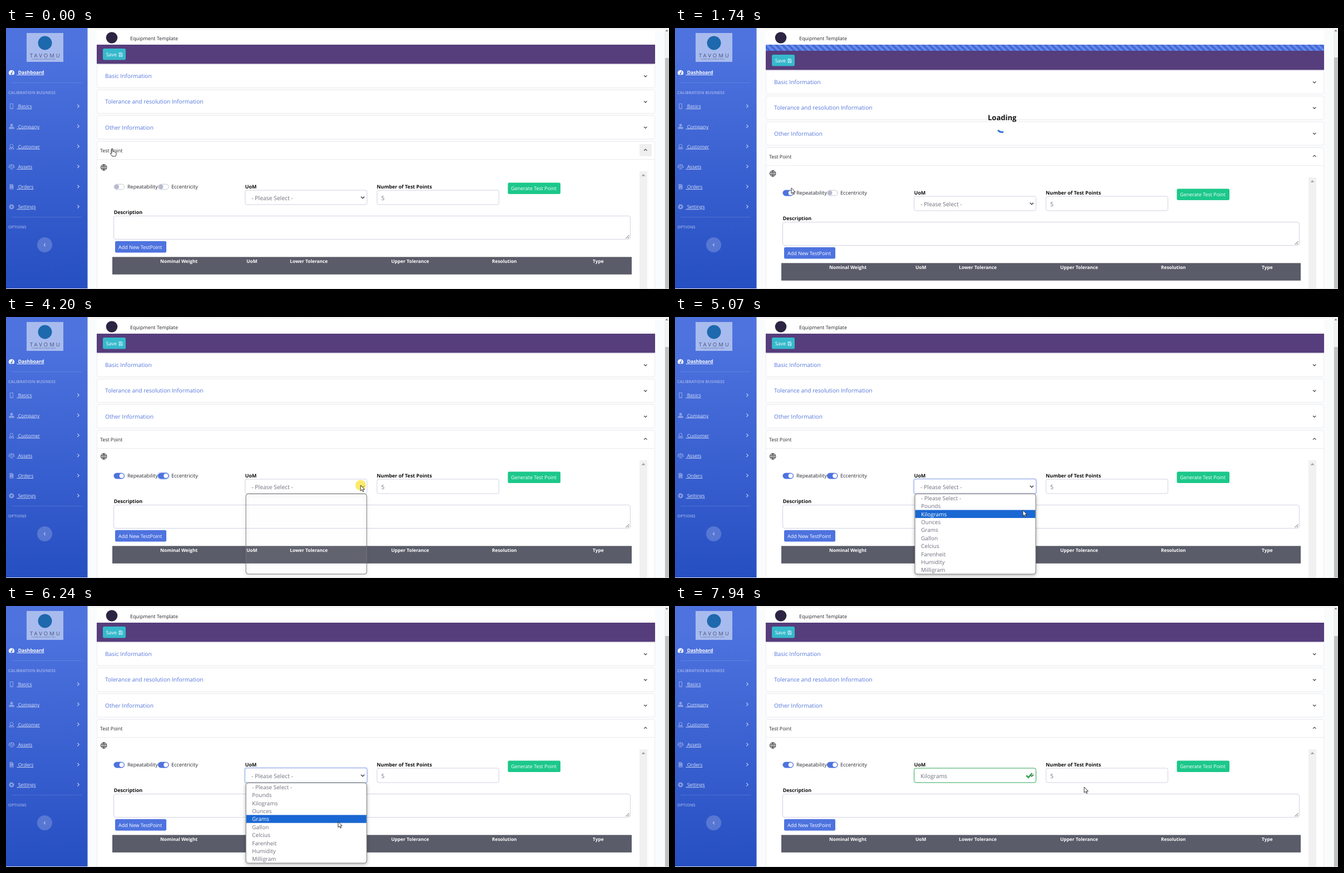
These frames come from a looping animation (1191x470 px, 8 s). An HTML page:

```html
<!DOCTYPE html>
<html lang="en">
<head>
<meta charset="utf-8">
<title>Equipment Template</title>
<style>
  html, body { margin: 0; width: 100%; height: 100%; overflow: hidden; background: #fafbfc; }
  svg { display: block; font-family: "Open Sans", "Noto Sans", sans-serif; text-rendering: geometricPrecision; }
</style>
</head>
<body>
<svg id="stage" width="1191" height="470">
  <defs>
    <linearGradient id="side" x2="0" y2="1">
      <stop offset=".08" stop-color="#4e73df"/><stop offset="1" stop-color="#264fc2"/>
    </linearGradient>
    <linearGradient id="top" x2="0" y2="1">
      <stop stop-color="#eeeef0"/><stop offset="1" stop-color="#fff"/>
    </linearGradient>
    <pattern id="stripes" width="11" height="11" patternUnits="userSpaceOnUse">
      <rect width="11" height="11" fill="#4169d8"/>
      <path d="M0 0H5.5L11 5.5V11ZM0 5.5V11H5.5Z" fill="#6a8ae6"/>
    </pattern>
    <filter id="shadow" x="-10%" y="-10%" width="120%" height="125%">
      <feDropShadow dx="0" dy="2" stdDeviation="3" flood-opacity=".3"/>
    </filter>
  </defs>
  <g id="page"></g>
  <g id="live"></g>
</svg>
<script>
const LOOP = 8000;
const BLUE = '#4e73df', FIELD = '#d1d3e2', GREY = '#6e707e', INK = '#26272e';
const OPTIONS = ['- Please Select -', 'Pounds', 'Kilograms', 'Ounces', 'Grams', 'Gallon',
  'Celcius', 'Farenheit', 'Humidity', 'Milligram'];
const ROW = 14.4, LIST_TOP = 318.7;

// Cursor path: time, x, y
const PATH = [[170, 191, 217], [950, 209, 288], [1900, 209, 288], [2300, 252, 291], [2700, 290, 286],
  [2950, 287, 284], [3400, 287, 284], [4130, 637, 303], [4830, 637, 303], [5420, 604, 427],
  [5620, 603, 443], [5800, 602, 447], [6440, 595, 371], [6500, 595, 371], [7000, 591, 359],
  [7420, 591, 359], [7940, 735, 326]];
const CLICKS = [[1090, 1210], [2840, 2990], [4130, 4330], [7270, 7420]];
const LOADS = [[1540, 1810], [7500, 7780]];

const clamp = v => Math.max(0, Math.min(1, v));
const during = (t, spans) => spans.some(([a, b]) => t >= a && t < b);

const text = (x, y, s, size, fill, extra = '') =>
  `<text x="${x}" y="${y}" font-size="${size}" fill="${fill}" ${extra}>${s}</text>`;
const bold = (x, y, s, size = 8.95, fill = '#111') => text(x, y, s, size, fill, 'font-weight="700"');
const rect = (x, y, w, h, fill, r = 0, extra = '') =>
  `<rect x="${x}" y="${y}" width="${w}" height="${h}" rx="${r}" fill="${fill}" ${extra}/>`;
const disc = (x, y, r, fill, extra = '') => `<circle cx="${x}" cy="${y}" r="${r}" fill="${fill}" ${extra}/>`;
const line = (d, color, w = 1, extra = '') =>
  `<path d="${d}" fill="none" stroke="${color}" stroke-width="${w}" ${extra}/>`;
const shape = (d, fill) => `<path d="${d}" fill="${fill}"/>`;
const at = (x, y, s) => `<g transform="translate(${x} ${y})">${s}</g>`;
const box = (x, y, w, h, color = FIELD, r = 3.5) => rect(x, y, w, h, '#fff', r, `stroke="${color}"`);

function sidebar() {
  const soft = '#fff" fill-opacity=".38', edge = 'rgba(255,255,255,.4)';
  const icons = [
    line('M-2.5 -4.5h5v9h-5ZM-.8 3h1.6', edge),
    disc(0, -2.3, 2.5, soft) + shape('M-4.8 4.5V3Q-4.8 .8 -2 .8H2Q4.8 .8 4.8 3V4.5Z', soft),
    line('M-3 -1a3 3 0 1 1 6 0a3 3 0 1 1 -6 0M-4.3 4.5Q-4 2 -1.5 1.7L0 3.5 1.5 1.7Q4 2 4.3 4.5Z', edge),
    line('M0 -4.5V4M-3 4.2H3M-4 -3H4M-5.3 1.5L-3.6 -2.5 -1.8 1.5ZM1.8 1.5L3.6 -2.5 5.3 1.5Z', edge),
    shape('M-3.5 -4.8H1.2L3.5 -2.5V4.8H-3.5Z', soft) + line('M-1.8 -2.5H.5M-1.8 2.8H1.8', '#3c62d2'),
    disc(0, 0, 2.7, 'none', `stroke="${edge}" stroke-width="2"`) +
      disc(0, 0, 4, 'none', `stroke="${edge}" stroke-width="1.6" stroke-dasharray="1.6 1.54"`)
  ];
  const items = ['Basics', 'Company', 'Customer', 'Assets', 'Orders', 'Settings'].map((name, i) => {
    const y = 141 + i * 36.2;
    return at(10, y, icons[i]) +
      text(19.4, y + 3.3, '&nbsp;' + name, 8.65, '#dbe3f9', 'text-decoration="underline"') +
      line(`M128.3 ${y - 3.2}l3 2.9 -3 2.9`, '#b7c6f2', 1.2);
  }).join('');
  const heading = (y, s) => bold(4, y, s, 7.25, 'rgba(255,255,255,.42)');
  return rect(0, 0, 146.5, 469, 'url(#side)') +
    rect(37, 9, 66, 52, '#a8bbee') + disc(70, 27, 12.5, '#1e68ae') +
    text(43, 52.5, 'TAVOMU', 9.5, '#46506f', 'letter-spacing="3"') +
    text(46, 57, 'CALIBRATION SOFTWARE TOOLS', 2.9, '#5b678c') +
    at(10, 80, shape('M-5.2 1A5.2 5.2 0 1 1 5.2 1Q5 3 4 4.2H-4Q-5 3 -5.2 1Z', '#fff') +
      line('M0 2.2L1.8 -2.5M-3.5 1h1M2.7 1h1', '#4168d8', 1.1) + disc(0, 2.2, 1.3, '#4168d8')) +
    text(19.4, 83.2, '&nbsp;Dashboard', 8.65, '#fff', 'font-weight="700" text-decoration="underline"') +
    line('M10 98.5H136M10 340.5H136', 'rgba(255,255,255,.13)') +
    heading(118.8, 'CALIBRATION BUSINESS') + heading(361, 'OPTIONS') + items +
    disc(69.5, 390.5, 13.6, 'rgba(255,255,255,.2)') + line('M70.7 388l-2.4 2.5 2.4 2.5', '#b7c6f2', 1.1);
}

const header = () => rect(163, 0, 1003, 30, '#fff') + rect(147, 0, 1036, 5, 'url(#top)') +
  disc(190, 17.5, 10.3, '#2c2442') + text(223, 22, 'Equipment Template', 8.9, INK);

const chevron = (y, dir) => line(`M1146 ${y - 1.3 * dir}l2.7 ${2.6 * dir} 2.7 ${-2.6 * dir}`, '#333', 1.1);

// Everything the progress bar pushes down
function cards() {
  const panels = ['Basic Information', 'Tolerance and resolution Information', 'Other Information']
    .map((s, i) => {
      const y = 65 + i * 46.2;
      return box(163.5, y + .5, 1002, 42, '#ececef', 3) +
        text(178, y + 25.2, s, 10.2, '#5577dc') + chevron(y + 21.7, 1);
    }).join('');
  const columns = [[277, 'Nominal Weight'], [432, 'UoM'], [510, 'Lower Tolerance'], [692, 'Upper Tolerance'],
    [873, 'Resolution'], [1054, 'Type']].map(([x, s]) => bold(x, 422.8, s, 8.35, '#fff')).join('');
  return rect(163, 30, 1003, 34.5, '#563d7c') + rect(174, 37, 41, 20.5, '#36b9cc', 2.5) +
    text(179.7, 51, 'Save', 8.9, '#fff') +
    line('M203 44.7h4.7l1.3 1.3v5.3h-6ZM204.5 44.7v2h2.6v-2M204.5 51v-2.3h3V51', '#e6fafc', .8) +
    panels + box(163.5, 204.5, 1002, 280, '#ececef', 3) + line('M164 236.7H1165', '#e9e9ec');

  function unused() {}
}

function form() {
  const columns = [[277, 'Nominal Weight'], [432, 'UoM'], [510, 'Lower Tolerance'], [692, 'Upper Tolerance'],
    [873, 'Resolution'], [1054, 'Type']].map(([x, s]) => bold(x, 422.8, s, 8.35, '#fff')).join('');
  return text(169, 224, 'Test Point', 8.85, INK) + chevron(219.5, -1) +
    at(175.7, 251, disc(0, 0, 5.2, 'none', `stroke="${INK}"`) +
      line('M-5 -1.8H5M-5 1.8H5M0 -5.2V5.2M0 -5.2Q-5 0 0 5.2Q5 0 0 -5.2', INK, .8)) +
    rect(1138, 258, 14, 212, '#f1f1f1') + shape('M1141.5 266.8h7l-3.5 -3.8Z', '#a3a3a3') +
    text(218, 289.4, 'Repeatability', 9.05, INK) + text(297, 289.4, 'Eccentricity', 9.05, INK) +
    bold(429.5, 289.3, 'UoM') + bold(666, 289.3, 'Number of Test Points') +
    box(666.5, 292, 219, 26) + text(674, 310, '5', 10.4, GREY) +
    rect(901.5, 278.5, 94.5, 20.5, '#1cc88a', 2.5) + text(907.3, 292.3, 'Generate Test Point', 8.95, '#fff') +
    bold(193.7, 335.3, 'Description') + box(193.5, 338.5, 928, 42) +
    line('M1113.5 379l6 -6M1117 379l2.5 -2.5', '#444', .9) +
    rect(196, 383.7, 92, 20.8, BLUE, 2.5) + text(202, 397.6, 'Add New TestPoint', 8.95, '#fff') +
    rect(191, 412.3, 933, 31.5, '#5a5c69') + columns;
}

function toggle(x, on, focus) {
  return (focus ? rect(x - 2, 279, 23, 14, BLUE, 7, 'fill-opacity=".25"') : '') +
    rect(x + .5, 281.3, 18.5, 9.6, '#fff', 4.8, 'stroke="#c3c5d5"') +
    rect(x, 280.8, 19.5, 10.6, BLUE, 5.3, `opacity="${on}"`) +
    disc(x + 5.4 + 8.8 * on, 286.1, 4, on > .5 ? '#fff' : '#b7b9cc');
}

function select(t) {
  const chosen = t >= 7420, focus = t >= 4270 && !chosen;
  return (focus ? rect(427.5, 290, 223, 30, BLUE, 5, 'fill-opacity=".25"') : '') +
    box(429.5, 292, 219, 26, chosen ? '#2ea653' : focus ? '#a9bbf0' : FIELD) +
    text(441, 310, chosen ? 'Kilograms' : OPTIONS[0], 10.4, GREY) +
    line('M637.7 303.7l3.1 3.1 3.1 -3.1', '#40424c', 1.5) +
    (chosen ? line('M631.3 305.3l3.6 3.5 6.6 -7.8', '#28a745', 2.6) : '');
}

function popup(t, y) {
  if (t < 4200 || t >= 7420) return '';
  const frame = 'stroke="#767676" filter="url(#shadow)"';
  if (t < 4270) return rect(431, 318.5, 217, 144.5, '#fff', 4, 'fill-opacity=".04" ' + frame);
  const active = Math.max(0, Math.floor((y - LIST_TOP) / ROW));
  return rect(431, 318.5, 217, 144.5, '#fff', 4, frame) +
    rect(431.5, LIST_TOP + active * ROW, 216, ROW, '#1967d2') +
    OPTIONS.map((s, i) => text(442, LIST_TOP + 11.1 + i * ROW, s, 10, i === active ? '#fff' : GREY)).join('');
}

function loader(t) {
  const turn = (t - 1740) * .36;
  return `<rect x="163" y="30" width="1003" height="11" fill="url(#stripes)"/>` +
    bold(562, 165.7, 'Loading', 13, '#111') +
    line('M589 187.4A9.5 9.5 0 0 1 580.8 184.7', '#2f6fd8', 2.8,
      `stroke-linecap="round" transform="rotate(${turn} 587.5 178)"`);
}

function cursorAt(t) {
  const i = PATH.findIndex(p => p[0] > t);
  if (i < 1) return (i ? PATH[PATH.length - 1] : PATH[0]).slice(1);
  const [a, b] = [PATH[i - 1], PATH[i]], u = (t - a[0]) / (b[0] - a[0]), s = u * u * (3 - 2 * u);
  return [a[1] + (b[1] - a[1]) * s, a[2] + (b[2] - a[2]) * s];
}

function pointer(x, y, hand) {
  const d = hand
    ? 'M-1 1Q0 -.6 1.1 1V5.5Q2.4 4.6 3.2 6Q4.6 5.2 5.2 6.7Q7 6.2 7 8V10.5Q6.8 12 5.8 14H0L-3.6 9Q-3.8 7.4 -1 8.8Z'
    : 'M0 0V10.2L2.4 8 4 11.5 5.7 10.8 4.1 7.4H7.2Z';
  return at(x, y, `<path d="${d}" fill="#fff" stroke="#222" stroke-width=".9" stroke-linejoin="round"/>`);
}

function live(t) {
  const [x, y] = cursorAt(t), loading = during(t, LOADS), hover = t < 1000 && y < 237;
  const thumb = loading ? 53 : 54;
  return at(0, loading ? 11 : 0,
      cards() + (hover ? rect(1138, 209, 22, 22, '#efefef', 2) : '') + form() +
      toggle(193.5, clamp((t - 1120) / 120), false) +
      toggle(273, clamp((t - 2920) / 120), t >= 2920 && t < 4270) + select(t)) +
    rect(1184, thumb, 7, 470 - thumb, '#c1c1c1') + rect(0, 469, 1191, 1, '#e3e4e8') +
    popup(t, y) + (loading ? loader(t) : '') +
    (during(t, CLICKS) ? disc(x, y, 9.5, '#fae11e', 'fill-opacity=".66"') : '') + pointer(x, y, hover);
}

const page = document.getElementById('page'), layer = document.getElementById('live');
page.innerHTML = sidebar() + header() + rect(1183, 0, 8, 470, '#f1f1f1') +
  shape('M1184.5 6h5l-2.5 -3Z', '#777');

function draw() {
  layer.innerHTML = live(performance.now() % LOOP);
  requestAnimationFrame(draw);
}
draw();
</script>
</body>
</html>
```
